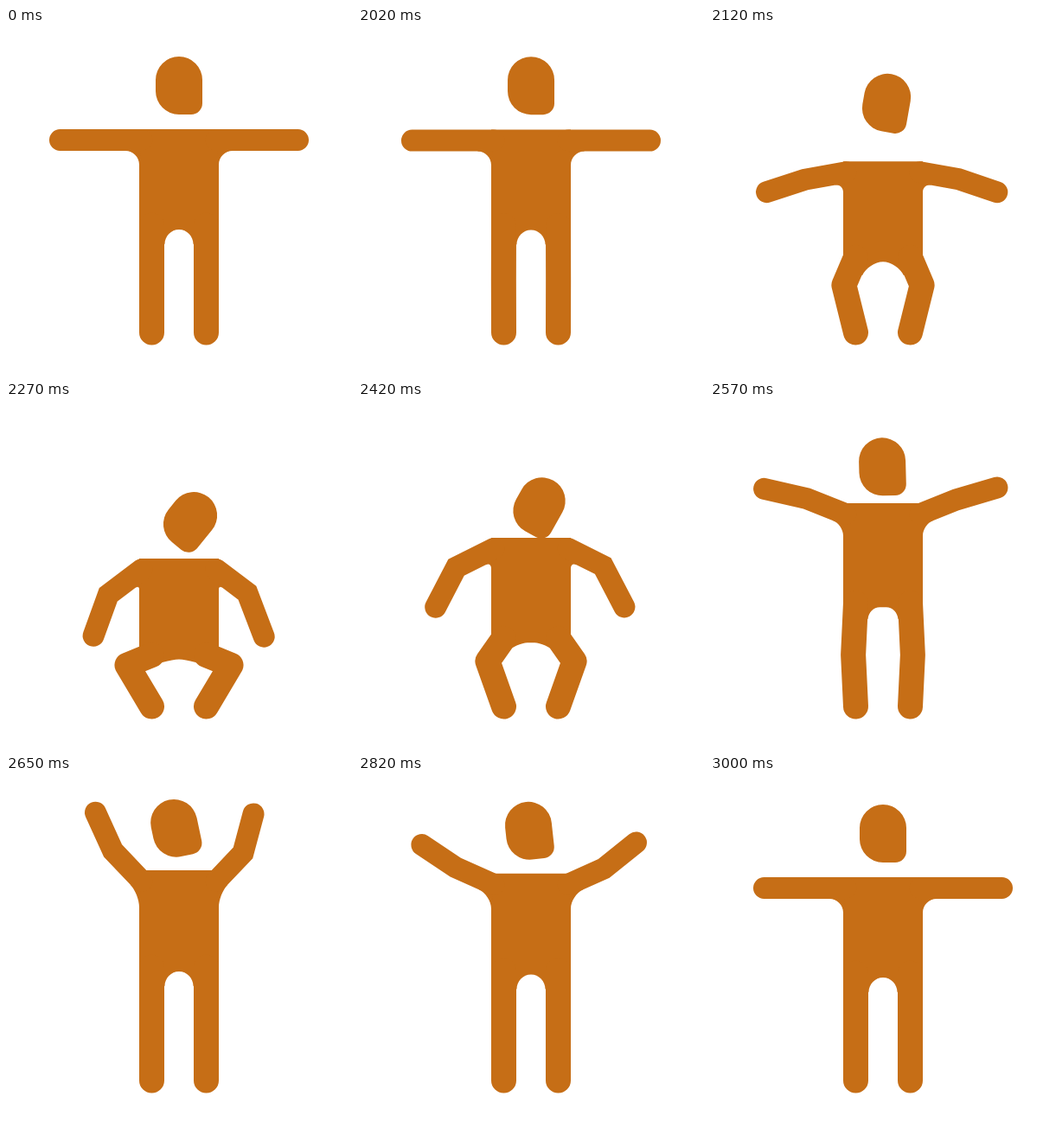
An HTML page that plays this animation: 400x400 px, repeating every 3.02 s.

```html
<!DOCTYPE html>
<html lang="en">
<head>
<meta charset="utf-8">
<title>Squat and stretch</title>
<style>
  html, body { margin: 0; width: 100%; height: 100%; overflow: hidden; background: #fff; }
  svg { display: block; width: 100%; height: 100%; }
  .limb { fill: none; stroke: #c66e16; stroke-linecap: round; }
  .arm { stroke-width: 25; stroke-linejoin: miter; }
  .leg { stroke-width: 29; stroke-linejoin: round; }
</style>
</head>
<body>
<svg viewBox="0 0 400 400" fill="#c66e16">
  <path id="head" d="M-27-6.5A27 27 0 0 1 27-6.5V20.5A13 13 0 0 1 14 33.5H0A27 27 0 0 1-27 6.5Z"/>
  <path id="torso"/>
  <path id="armpits"/>
  <path id="arms" class="limb arm"/>
  <path id="legs" class="limb leg"/>
</svg>
<script>
const LOOP = 3020;
const times = [2020, 2120, 2270, 2320, 2500, 2650, 3000, 3020];

// Standing, dropping, low, lowest, rising, stretched; then back to standing.
const poses = {
  top:       [117, 154, 181, 183, 131, 109],
  crotch:    [233, 270, 297.5, 299.5, 254.5, 226],
  headX:     [200, 204, 213, 213.5, 204.5, 195.5],
  headY:     [66.5, 86, 136, 140, 96, 60.3],
  headTilt:  [0, 10, 39, 42, 13.5, -12],
  upperArm:  [0, 10, 37, 39, 8, -46.5],
  leftFore:  [0, 18, 70, 74, 42.5, -65.5],
  leftReach: [46, 46, 50.5, 51, 52, 48.5],
  rightFore: [0, 18.5, 69, 73, 43.5, -75],
  rightReach:[49.5, 47, 54, 54, 52, 46.5],
  armpit:    [16, 10, 5, 5, 10, 15],
  kneeX:     [168.5, 155, 140, 139, 160.5, 168.5],
  archX:     [183.5, 176, 161, 160, 180.5, 183.5],
  archDrop:  [17, 16, 11.5, 11.5, 11, 17],
  archEnd:   [200, 200, 200, 200, 193, 200]
};

// Shape-preserving cubic through the given values.
function makeTrack(values) {
  const v = [...values, values[0], values[0]];
  const last = v.length - 1;
  const step = times.slice(1).map((t, i) => t - times[i]);
  const rate = step.map((h, i) => (v[i + 1] - v[i]) / h);
  const slope = v.map((_, i) => {
    if (i === last) return 0;
    if (i === 0) {
      const s = ((2 * step[0] + step[1]) * rate[0] - step[0] * rate[1]) / (step[0] + step[1]);
      if (s * rate[0] <= 0) return 0;
      return Math.abs(s) > 3 * Math.abs(rate[0]) ? 3 * rate[0] : s;
    }
    const a = rate[i - 1], b = rate[i];
    if (a * b <= 0) return 0;
    const wa = 2 * step[i] + step[i - 1], wb = step[i] + 2 * step[i - 1];
    return (wa + wb) / (wa / a + wb / b);
  });
  return time => {
    if (time <= times[0]) return v[0];
    let i = 0;
    while (i < last - 1 && time > times[i + 1]) i++;
    const h = step[i], u = (time - times[i]) / h, w = 1 - u;
    return v[i] * w * w * (1 + 2 * u) + v[i + 1] * u * u * (3 - 2 * u)
      + h * u * w * (slope[i] * w - slope[i + 1] * u);
  };
}

const tracks = Object.entries(poses).map(([name, values]) => [name, makeTrack(values)]);
const part = id => document.getElementById(id);
const [head, torso, armpits, arms, legs] = ["head", "torso", "armpits", "arms", "legs"].map(part);

const pt = p => p.map(n => n.toFixed(2)).join(" ");
const mirror = ([x, y]) => [400 - x, y];
const polyline = points => "M" + points.map(pt).join("L");
const mix = (a, b, k) => a.map((n, i) => n + (b[i] - n) * k);
const roundTo = (from, corner, to) =>
  "C" + [mix(from, corner, .552), mix(to, corner, .552), to].map(pt).join(" ");

// Points of the left side; the right side is mirrored afterwards.
const toward = ([x, y], degrees, length) => {
  const a = degrees * Math.PI / 180;
  return [x - Math.cos(a) * length, y + Math.sin(a) * length];
};

function armPoints(p, upperLength, fore, reach) {
  const shoulder = [157, p.top + 12.5];
  const elbow = toward(shoulder, p.upperArm, upperLength);
  return [shoulder, elbow, toward(elbow, fore, reach)];
}

function armpitPath(p, place) {
  const a = p.upperArm * Math.PI / 180;
  const shoulder = [157, p.top + 12.5];
  const corner = [154, shoulder[1] + 12.5 / Math.cos(a) + 3 * Math.tan(a)];
  const onArm = place(toward(corner, p.upperArm, p.armpit));
  const onSide = place([154, corner[1] + p.armpit]);
  return polyline([place(shoulder), onArm]) + roundTo(onArm, place(corner), onSide) + "Z";
}

function torsoPath(p, hipY) {
  const start = [p.archX, p.crotch + p.archDrop];
  const corner = [183.5, p.crotch], end = [p.archEnd, p.crotch];
  return polyline([[154, hipY], [154, p.top], [246, p.top], [246, hipY], mirror(start)])
    + roundTo(mirror(start), mirror(corner), mirror(end))
    + "L" + pt(end) + roundTo(end, corner, start) + "Z";
}

function draw(time) {
  const p = Object.fromEntries(tracks.map(([name, at]) => [name, at(time)]));
  const hipY = p.crotch - 5;
  const leg = [[168.5, hipY], [p.kneeX, 291 + (168.5 - p.kneeX) * .46], [168.5, 352]];
  const leftArm = armPoints(p, 48.5, p.leftFore, p.leftReach);
  const rightArm = armPoints(p, 45, p.rightFore, p.rightReach).map(mirror);

  head.setAttribute("transform", `translate(${p.headX} ${p.headY}) rotate(${p.headTilt})`);
  torso.setAttribute("d", torsoPath(p, hipY));
  armpits.setAttribute("d", armpitPath(p, q => q) + armpitPath(p, mirror));
  arms.setAttribute("d", polyline(leftArm) + polyline(rightArm));
  legs.setAttribute("d", polyline(leg) + polyline(leg.map(mirror)));
}

const began = performance.now();
function tick() {
  draw((performance.now() - began) % LOOP);
  requestAnimationFrame(tick);
}
tick();
</script>
</body>
</html>
```
